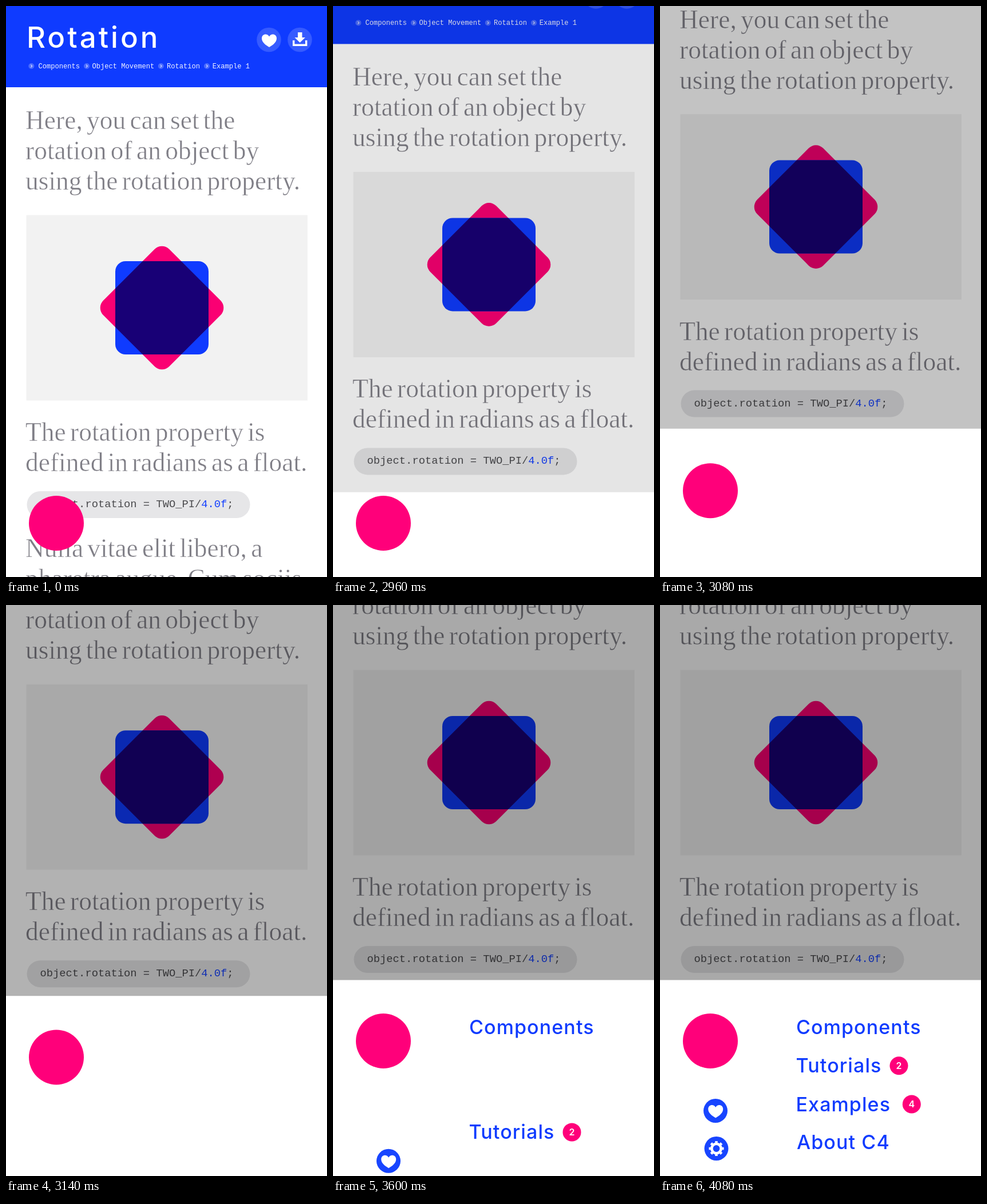
Recreate the animation shown at these times as an HTML page. Size 561 px wide and 998 px high, loop 6.94 s.

```html
<!DOCTYPE html>
<html lang="en">
<head>
<meta charset="utf-8">
<title>Rotation</title>
<style>
  html, body { margin: 0; width: 100%; height: 100%; overflow: hidden; background: #fff; }
  svg { display: block; width: 100%; height: 100%; }
  text { white-space: pre; }
  .title { font: 500 51px Inter, sans-serif; letter-spacing: 4px; fill: #fff; }
  .crumbs { font: 12.1px "Liberation Mono", monospace; fill: #f0f2ff; }
  /* The white outline thins the serif to a light weight. */
  .body { font: 45.5px "Liberation Serif", serif; word-spacing: -4.1px; fill: #7f7e86; stroke: #fff; stroke-width: .6px; }
  .code { font: 18.8px "Liberation Mono", monospace; fill: #4b4b4e; }
  .menu { font: 500 34px Inter, sans-serif; letter-spacing: 1.1px; fill: #0f3bff; }
  .badge { font: 600 16px Inter, sans-serif; fill: #fff; text-anchor: middle; }
</style>
</head>
<body>
<svg viewBox="0 0 561 998">
  <defs>
    <path id="heart" fill="#fff" d="M0 11.5C-6 8-13 3-13-4C-13-12-3-13.5 0-7C3-13.5 13-12 13-4C13 3 6 8 0 11.5Z"/>
    <g id="bullet">
      <circle r="5" fill="#fff" fill-opacity=".25"/>
      <path d="M-1-2.3L1.3 0L-1 2.3" fill="none" stroke="#fff" stroke-opacity=".8" stroke-width="1.1"/>
    </g>
    <rect id="square" x="191" y="446" width="163" height="163" rx="18"/>
    <clipPath id="diamond"><use href="#square" transform="rotate(45 272.5 527.5)"/></clipPath>
  </defs>

  <g id="page">
    <rect width="561" height="142" fill="#0f3bff"/>
    <text class="title" x="36" y="73">Rotation</text>
    <g id="crumbs" class="crumbs"></g>
    <g fill="#fff" fill-opacity=".16">
      <circle cx="459.5" cy="59" r="21.3"/>
      <circle cx="513.5" cy="59" r="21.3"/>
    </g>
    <use href="#heart" x="460" y="60.5"/>
    <path fill="#fff" d="M510 46h7.5v9h5.5l-9.3 9l-9.2-9h5.5z"/>
    <path fill="none" stroke="#fff" stroke-width="3.4" d="M502.7 60v8.3h22v-8.3"/>

    <g id="copy" class="body"></g>

    <rect x="35.5" y="365.5" width="491.5" height="324" fill="#f2f2f2"/>
    <use href="#square" fill="#fa0073" transform="rotate(45 272.5 527.5)"/>
    <use href="#square" fill="#0f3bff"/>
    <g clip-path="url(#diamond)"><use href="#square" fill="#180076"/></g>

    <rect x="36.5" y="848" width="390" height="47" rx="23.5" fill="#e6e6e8"/>
    <text class="code" x="59.5" y="876">object.rotation = TWO_PI/<tspan fill="#1440ff">4.0f</tspan>;</text>
  </g>

  <rect id="dim" width="561" height="998"/>
  <rect id="sheet" width="561" height="998" fill="#fff"/>
  <circle id="mark" cx="88" cy="904" r="48" fill="#ff007a"/>

  <g id="menu">
    <g><text class="menu" x="238" y="750">Components</text></g>
    <g>
      <text class="menu" x="237.5" y="817">Tutorials</text>
      <circle cx="417.5" cy="805.3" r="16" fill="#ff007a"/>
      <text class="badge" x="417.5" y="811.2">2</text>
    </g>
    <g>
      <text class="menu" x="237.5" y="884.5">Examples</text>
      <circle cx="439.8" cy="872.5" r="16" fill="#ff007a"/>
      <text class="badge" x="439.8" y="878.4">4</text>
    </g>
    <g><text class="menu" x="239" y="951">About C4</text></g>
    <g>
      <circle cx="97" cy="884" r="21" fill="#1845ff"/>
      <use href="#heart" x="97.2" y="885"/>
    </g>
    <g>
      <circle cx="98.5" cy="950" r="21" fill="#1845ff"/>
      <g fill="none" stroke="#fff" stroke-width="4.6">
        <circle cx="98.5" cy="950" r="8.2"/>
        <circle cx="98.5" cy="950" r="10.8" pathLength="16" stroke-dasharray="1 1"
                transform="rotate(-11.25 98.5 950)"/>
      </g>
    </g>
  </g>
</svg>

<script>
const LOOP = 6940, OPEN = 2870, MENU = 3480, STEP = 30;
const $ = id => document.getElementById(id);

function add(parent, tag, attrs, text = "") {
  const el = document.createElementNS("http://www.w3.org/2000/svg", tag);
  for (const name in attrs) el.setAttribute(name, attrs[name]);
  el.textContent = text;
  parent.append(el);
}

[["Components", 44.3, 56.5], ["Object Movement", 141, 150.5],
 ["Rotation", 270.8, 281], ["Example 1", 351, 360.8]].forEach(([label, bulletX, textX]) => {
  add($("crumbs"), "use", { href: "#bullet", x: bulletX, y: 105 });
  add($("crumbs"), "text", { x: textX, y: 109 }, label);
});

[["Here, you can set the", 215], ["rotation of an object by", 268],
 ["using the rotation property.", 321], ["The rotation property is", 760],
 ["defined in radians as a float.", 813], ["Nulla vitae elit libero, a", 963],
 ["pharetra augue. Cum sociis", 1016]].forEach(([line, y]) => add($("copy"), "text", { x: 34, y }, line));

// Start, end and travel of each menu part, in document order.
const slides = [
  [3450, 3600, 277], [3450, 3760, 225], [3600, 3920, 225],
  [3760, 4080, 225], [3450, 3760, 170], [3600, 3920, 170]
];

const progress = (t, start, end) => Math.min(1, Math.max(0, (t - start) / (end - start)));
const shift = (el, y) => el.setAttribute("transform", `translate(0 ${y})`);

// Motion advances in 30 ms steps, counted from the start of each phase.
function stepped(t) {
  if (t < OPEN) return t;
  const base = t < MENU ? OPEN : MENU;
  return base + Math.floor((t - base) / STEP) * STEP;
}

function draw(time) {
  const t = stepped(time);
  const open = progress(t, OPEN, 3170);
  shift($("page"), -252 * open);
  $("dim").setAttribute("opacity", 0.337 * open);
  $("sheet").setAttribute("y", t < OPEN ? 998 : 933 - 277.5 * open);
  shift($("mark"), -142 * progress(t, 3020, 3170));
  $("menu").setAttribute("visibility", t < MENU ? "hidden" : "visible");
  slides.forEach(([start, end, travel], i) =>
    shift($("menu").children[i], travel * (1 - progress(t, start, end))));
}

const began = performance.now();
function tick() {
  draw((performance.now() - began) % LOOP);
  requestAnimationFrame(tick);
}
tick();
</script>
</body>
</html>
```
